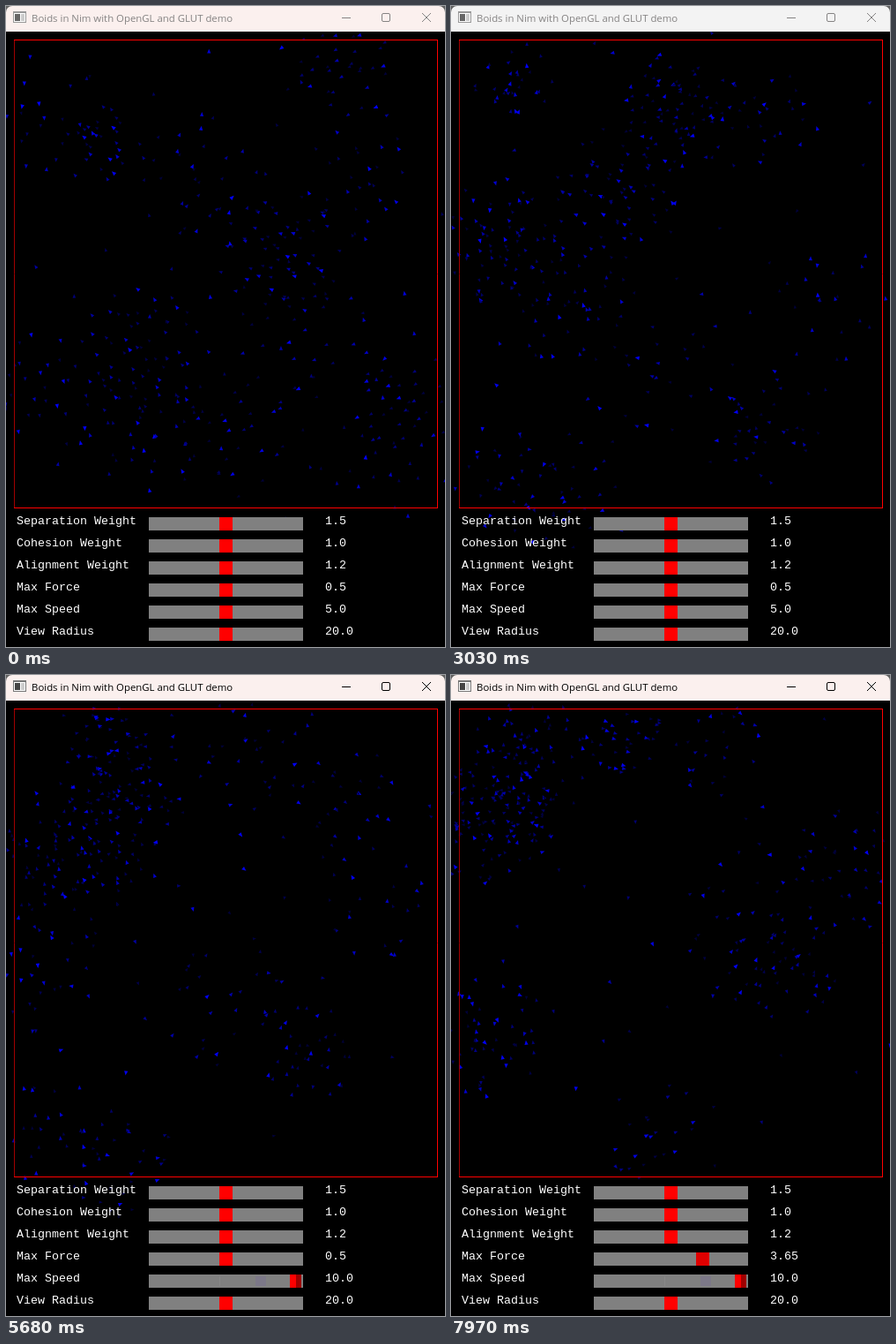
An HTML page with a canvas that plays this animation: 498 by 726 pixels, repeating every 8 s.

```html
<!DOCTYPE html>
<html lang="en">
<head>
<meta charset="utf-8">
<title>Boids</title>
<style>
  html, body { margin: 0; width: 498px; height: 726px; overflow: hidden; background: #000; }
  canvas { display: block; }
</style>
</head>
<body>
<canvas id="stage" width="498" height="726"></canvas>
<script>
const ctx = document.getElementById('stage').getContext('2d');
const LOOP = 8000;
const TURN = 2 * Math.PI;
const GOLDEN_ANGLE = Math.PI * (3 - Math.sqrt(5));

// The simulation redraws in bursts with an uneven rhythm.
const BURSTS = [70, 880, 1750, 2560, 3370, 4320, 5140, 5950, 6820, 7630];
const BEATS = [0, 70, 140, 270, 340, 470, 540, 670, 740];
const ticks = [0, ...BURSTS.flatMap(b => BEATS.map(o => b + o))].filter(t => t < 7980);
const lastTick = t => ticks.filter(k => k <= t).pop();

let seed = 20417;
function rnd() {
  seed = (seed * 1664525 + 1013904223) % 4294967296;
  return seed / 4294967296;
}

const clamp01 = v => Math.min(1, Math.max(0, v));
const ease = v => v * v * (3 - 2 * v);
const progress = (t, from, to) => ease(clamp01((t - from) / (to - from)));

// Parabola through three points spread evenly over the loop.
function arc(a, b, c, u) {
  return (2 * u - 1) * (u - 1) * a + 4 * u * (1 - u) * b + u * (2 * u - 1) * c;
}

// Members fill a sunflower disc, thinner towards the rim, and each one sways.
const boids = [];
function flock(size, radius, from, via, to) {
  for (let i = 0; i < size; i++) {
    const glow = Math.pow(rnd(), 1.7);
    boids.push({
      from, via, to,
      reach: 1.75 * radius * Math.pow((i + 0.5) / size, 0.65),
      angle: i * GOLDEN_ANGLE + rnd() * 0.6,
      spin: (rnd() - 0.5) * 1.6,
      sway: 4 + rnd() * 8,
      rate: 4 + rnd() * 7,
      phase: rnd() * TURN,
      scale: 0.75 + 0.25 * glow,
      blue: Math.round(55 + 200 * glow)
    });
  }
}

flock(30, 24, [110, 152], [75, 75], [200, 75]);
flock(60, 40, [315, 282], [155, 190], [90, 90]);
flock(40, 36, [380, 65], [210, 125], [60, 130]);
flock(55, 42, [155, 390], [50, 245], [45, 165]);
flock(36, 40, [172, 480], [120, 300], [45, 170]);
flock(30, 38, [42, 435], [70, 545], [42, 410]);
flock(34, 34, [450, 450], [345, 465], [380, 330]);
flock(26, 36, [400, 200], [360, 120], [462, 220]);
flock(18, 42, [430, 520], [430, 300], [400, 210]);
flock(26, 38, [265, 485], [130, 560], [235, 520]);
flock(28, 40, [220, 195], [275, 105], [300, 62]);
flock(24, 45, [340, 390], [230, 410], [340, 290]);
flock(20, 38, [35, 120], [35, 290], [40, 400]);
flock(50, 165, [250, 310], [240, 250], [260, 290]);

function place(b, t) {
  const u = t / LOOP;
  const a = b.angle + b.spin * u, w = b.phase + b.rate * u;
  const [x, y] = [0, 1].map(k => arc(b.from[k], b.via[k], b.to[k], u));
  return [
    x + b.reach * Math.cos(a) + b.sway * Math.sin(w),
    y + b.reach * Math.sin(a) + b.sway * Math.cos(w)
  ];
}

function drawBoid(b, t) {
  const [x, y] = place(b, t), [nx, ny] = place(b, t + 40);
  ctx.save();
  ctx.translate(x, y);
  ctx.rotate(Math.atan2(ny - y, nx - x));
  ctx.scale(b.scale, b.scale);
  ctx.fillStyle = `rgb(0,0,${b.blue})`;
  ctx.beginPath();
  ctx.moveTo(3, 0);
  ctx.lineTo(-2.2, -2.2);
  ctx.lineTo(-2.2, 2.2);
  ctx.fill();
  ctx.restore();
}

function rect(x, y, w, h, color) {
  ctx.fillStyle = color;
  ctx.fillRect(x, y, w, h);
}

function stroke(color, ...lines) {
  ctx.strokeStyle = color;
  ctx.lineWidth = 1;
  ctx.beginPath();
  for (const [x1, y1, x2, y2] of lines) {
    ctx.moveTo(x1, y1);
    ctx.lineTo(x2, y2);
  }
  ctx.stroke();
}

function drawTitle(t) {
  const focused = t >= 4320;
  const pink = t < 70 || t >= 4390;
  const ink = focused ? '#000' : '#858383';
  rect(0, 0, 498, 29, '#606060');
  ctx.fillStyle = pink ? '#fbf0ee' : '#f3f3f3';
  ctx.beginPath();
  ctx.roundRect(0, 0, 498, 29, [7, 7, 0, 0]);
  ctx.fill();

  rect(8, 6, 15, 13, focused ? '#777' : '#999');
  rect(9, 8, 13, 10, '#fff');
  rect(10, 9, 6, 8, focused ? '#444' : '#666');
  rect(17, 9, 4, 8, '#ccc');

  ctx.font = '11.4px "Open Sans", "Noto Sans", sans-serif';
  ctx.fillStyle = ink;
  ctx.fillText('Boids in Nim with OpenGL and GLUT demo', 29, 18);

  stroke(ink, [381, 13.5, 391, 13.5]);
  ctx.beginPath();
  ctx.roundRect(426.5, 8.5, 9, 9, 1.5);
  ctx.stroke();
  stroke(ink, [472, 8, 482, 18], [482, 8, 472, 18]);
}

function drawFrame() {
  stroke('#a00000', [9.5, 38, 9.5, 569]);
  stroke('#f00', [9, 38.5, 490, 38.5], [9, 568.5, 490, 568.5], [489.5, 38, 489.5, 569]);
}

function drawSlider(row, label, value, x = 242, color = '#f00') {
  const y = 579 + row * 25;
  rect(162, y, 175, 15, '#808080');
  ctx.font = '13.333px "Liberation Mono", monospace';
  ctx.fillStyle = '#fff';
  ctx.fillText(label, 12, y + 8);
  ctx.fillText(value, 362, y + 8);
  rect(Math.round(x), y, 15, 15, color);
}

const snap = v => Math.round(v * 20) / 20;
const show = v => Number.isInteger(v) ? v.toFixed(1) : String(v);

function drawSpeed(t) {
  const speed = snap(5 + 4.55 * progress(t, 4660, 5050) + 0.45 * progress(t, 5140, 5340));
  const text = speed === 9.55 ? '9.550000000000001' : show(speed);
  drawSlider(4, 'Max Speed', text, Math.floor(162 + speed * 16));
  if (t < 5040) return;
  rect(283, 681, 12, 11, '#7c7888');
  rect(242, 681, 1, 11, '#888');
  if (speed === 10) {
    rect(329, 679, 6, 15, '#a00000');
    rect(335, 679, 2, 15, '#808080');
  }
}

function drawForce(t) {
  const dragged = t >= 6640;
  const x = 242 + 36.4 * progress(t, 6600, 7430);
  const value = dragged ? snap((x - 161.6) / 32) : 0.5;
  drawSlider(3, 'Max Force', show(value), x, dragged ? '#e00000' : '#f00');
}

function draw(t) {
  rect(0, 0, 498, 726, '#000');
  for (const b of boids) drawBoid(b, t);
  drawTitle(t);
  drawFrame();
  drawSlider(0, 'Separation Weight', '1.5');
  drawSlider(1, 'Cohesion Weight', '1.0');
  drawSlider(2, 'Alignment Weight', '1.2');
  drawForce(t);
  drawSpeed(t);
  drawSlider(5, 'View Radius', '20.0');
}

const start = performance.now();
function loop() {
  draw(lastTick((performance.now() - start) % LOOP));
  requestAnimationFrame(loop);
}
loop();
</script>
</body>
</html>
```
